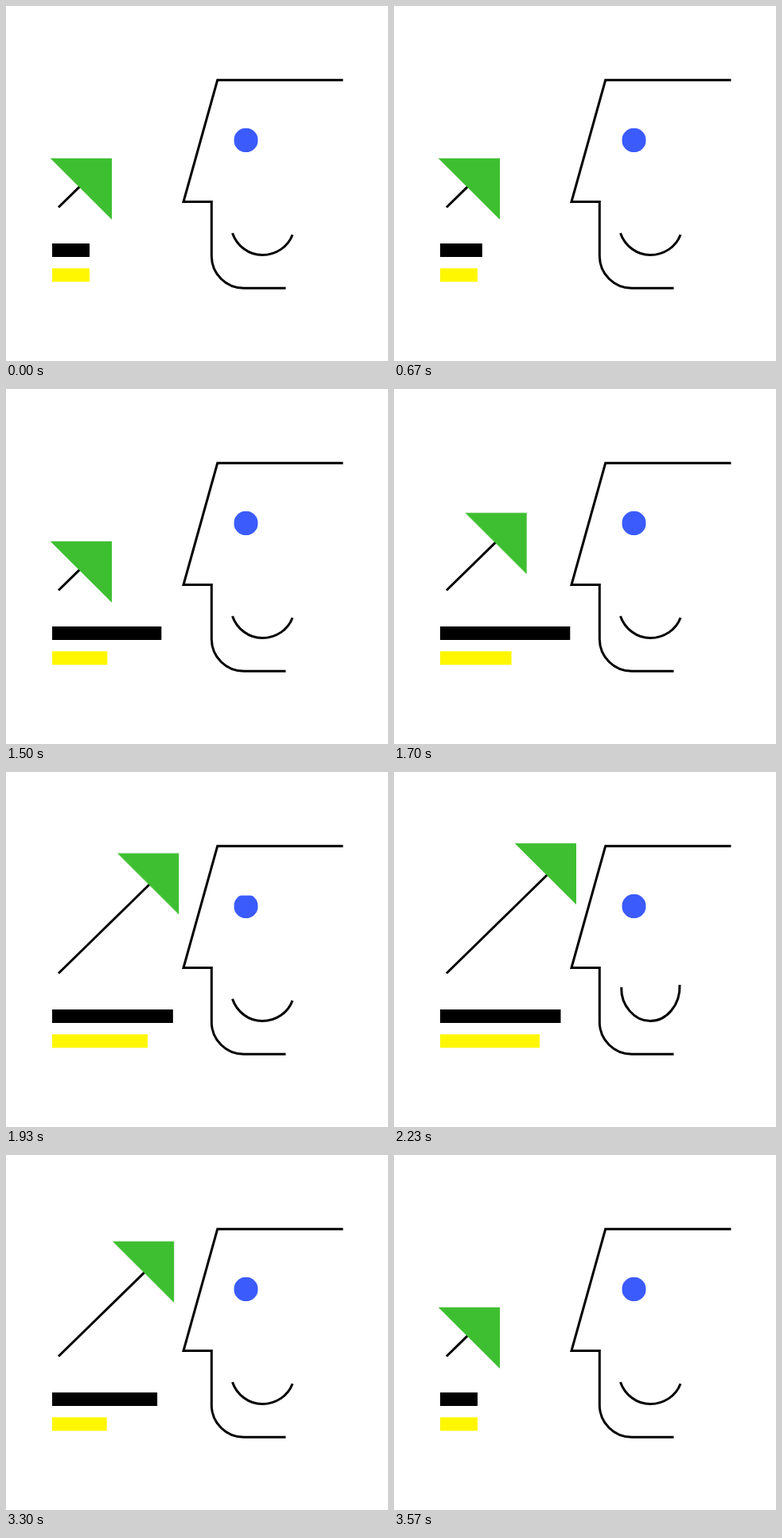
Write an HTML page that moves like this. It is 480 by 447 pixels and loops after 3610 ms.

```html
<!DOCTYPE html>
<html lang="en">
<head>
<meta charset="utf-8">
<title>Face and arrow</title>
<style>
  html, body { margin: 0; height: 100%; overflow: hidden; background: #fff; }
  svg { display: block; width: 100%; height: 100%; }

  .stroke { fill: none; stroke: #000; stroke-width: 3; }
  .black, .yellow, .head, .shaft, .eye, .smile {
    animation: 3610ms linear infinite;
  }
  .black { animation-name: black; }
  .yellow { fill: #fff700; animation-name: yellow; }
  .head { fill: #3ebf31; animation-name: head; }
  .shaft { stroke-dasharray: 200; animation-name: shaft; }
  .eye { fill: #3b5bfd; animation-name: blink; }
  .smile { animation-name: smile; }

  /* Bars grow, overshoot, settle, then retract */
  @keyframes black {
    0%, 9.14% { width: 47px; animation-timing-function: cubic-bezier(.66, 0, .85, 1); }
    47.92% { width: 164px; animation-timing-function: cubic-bezier(.45, 0, .55, 1); }
    54.29% { width: 151.5px; }
    87.4% { width: 151.5px; animation-timing-function: cubic-bezier(.65, 0, .35, 1); }
    98.61%, 100% { width: 47px; }
  }
  @keyframes yellow {
    0%, 24.43% { width: 47px; animation-timing-function: cubic-bezier(.66, 0, .85, 1); }
    56.54% { width: 128px; animation-timing-function: cubic-bezier(.45, 0, .55, 1); }
    69.25% { width: 119.5px; }
    87.4% { width: 119.5px; animation-timing-function: cubic-bezier(.55, 0, .45, 1); }
    94.18%, 100% { width: 47px; }
  }

  /* Arrow head and shaft share one timing */
  @keyframes head {
    0%, 41.55% { transform: none; animation-timing-function: cubic-bezier(.37, 0, .18, 1); }
    61.77% { transform: translate(96px, -102px); }
    87.4% { transform: translate(96px, -102px); animation-timing-function: cubic-bezier(.65, 0, .35, 1); }
    98.61%, 100% { transform: none; }
  }
  @keyframes shaft {
    0%, 41.55% { stroke-dashoffset: 155.2px; animation-timing-function: cubic-bezier(.37, 0, .18, 1); }
    61.77% { stroke-dashoffset: 6.8px; }
    87.4% { stroke-dashoffset: 6.8px; animation-timing-function: cubic-bezier(.65, 0, .35, 1); }
    98.61%, 100% { stroke-dashoffset: 155.2px; }
  }

  @keyframes blink {
    0%, 52.77%, 61.22%, 69.25%, 78.39%, 100% {
      clip-path: inset(0 0 0 0);
      animation-timing-function: ease-in-out;
    }
    57.06%, 73.68% {
      clip-path: inset(100% 0 0 0);
      animation-timing-function: ease-in-out;
    }
  }

  @keyframes smile {
    0%, 52.63% {
      d: path("M284.5 286C290 302 305 313.5 322 313.5C339.500 313.5 354.500 303 360 288");
      animation-timing-function: cubic-bezier(.5, 0, .4, 1);
    }
    61.5% { d: path("M285.7 271C285 294 302 313.5 322 313.5C342 313.5 360 294 359 268"); }
    87.26% {
      d: path("M285.7 271C285 294 302 313.5 322 313.5C342 313.5 360 294 359 268");
      animation-timing-function: ease-in-out;
    }
    91.27%, 100% { d: path("M284.5 286C290 302 305 313.5 322 313.5C339.5 313.5 354.5 303 360 288"); }
  }
</style>
</head>
<body>
<svg viewBox="0 0 480 447">
  <path class="stroke" d="M423.5 93.300H265.700L223 246.500H258.300V315A40.500 40.500 0 0 0 298.800 355.300H351.500"/>
  <circle class="eye" cx="301.500" cy="169" r="15.200"/>
  <path class="stroke smile" d="M284.500 286C290 302 305 313.500 322 313.500C339.500 313.500 354.500 303 360 288"/>
  <path class="stroke shaft" d="M66 253.500L204 118.300"/>
  <path class="head" d="M55.700 191.700H133V269Z"/>
  <rect class="black" x="58" y="299" width="47" height="17"/>
  <rect class="yellow" x="58" y="330.300" width="47" height="17"/>
</svg>
</body>
</html>
```
